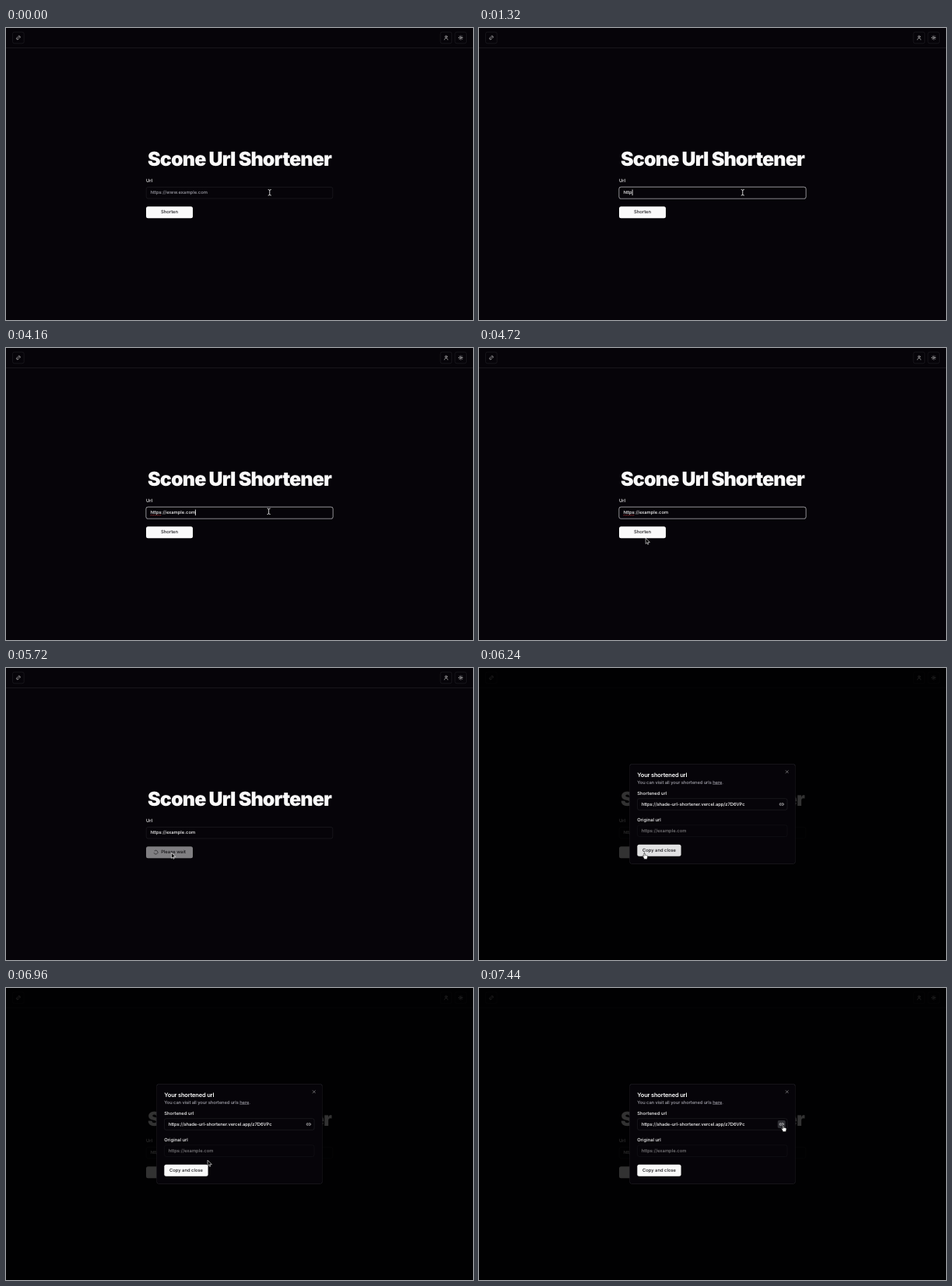
Recreate the animation shown at these times as an HTML page. Size 600x375 px, loop 8000 ms.

```html
<!DOCTYPE html>
<html lang="en">
<head>
<meta charset="utf-8">
<title>Url shortener</title>
<style>
  html, body { margin: 0; width: 100%; height: 100%; overflow: hidden; background: #060409; }
  #stage { position: relative; width: 1440px; height: 900px; transform: scale(calc(600 / 1440)); transform-origin: 0 0;
    overflow: hidden; background: #060409; color: #fafafa; font: 450 14px/20px Inter, sans-serif;
    text-rendering: geometricPrecision; font-feature-settings: "calt" 0; }
  #stage * { box-sizing: border-box; }
  .abs, .field, .button, .icon, .label { position: absolute; white-space: pre; }
  svg { fill: none; stroke: currentColor; stroke-width: 2; stroke-linecap: round; stroke-linejoin: round; }
  header { position: absolute; width: 100%; height: 61px; border-bottom: 1px solid #303035; }
  .icon { width: 36px; height: 36px; top: 12px; border: 1px solid #303035; border-radius: 6px; display: grid; place-items: center; }
  h1 { position: absolute; margin: 0; top: 374px; width: 100%; text-align: center; font: 900 60px/60px Inter, sans-serif; letter-spacing: -.035em; }
  .label { font-weight: 550; }
  .field { height: 36px; padding: 0 12px; line-height: 34px; border: 1px solid #303035; border-radius: 6px; }
  .field.focus { border-color: #b8b8bc; box-shadow: 0 0 0 1px #b8b8bc; }
  .muted { color: #a1a1aa; }
  .wavy { text-decoration: underline wavy #c33 1px; text-underline-offset: 1px; text-decoration-skip-ink: none; }
  #caret { display: inline-block; width: 2px; height: 18px; margin-right: -2px; vertical-align: -4px; background: #fafafa; }
  .button { height: 36px; border-radius: 6px; background: #fafafa; color: #18181b; font-weight: 550;
    display: flex; gap: 8px; align-items: center; justify-content: center; }
  .button.hover { background: #e2e2e3; }
  #overlay { inset: 0; background: #000c; }
  #dialog { left: 464px; top: 296px; width: 512px; height: 308px; border-radius: 8px; background: #060409; box-shadow: inset 0 0 0 1px #303035; }
  #copy { left: 457px; top: 112px; width: 24px; height: 24px; border-radius: 4px; display: grid; place-items: center; }
  #copy.hover { background: #303035; }
  #cursor { left: 0; top: 0; overflow: visible; }
</style>
</head>
<body>
<div id="stage">
  <header>
    <div class="icon" style="left:20px"><svg width="16" height="16" viewBox="0 0 24 24"><path id="chain" transform="rotate(-45 12 12)" d="M9 17H7A5 5 0 0 1 7 7h2M15 7h2a5 5 0 1 1 0 10h-2M8 12h8"/></svg></div>
    <div class="icon" style="left:1339px"><svg width="16" height="16" viewBox="0 0 24 24"><circle cx="12" cy="7" r="4.5"/><path d="M4 21.5C4.5 17 7.5 14 12 14s7.500 3 8 7.500"/></svg></div>
    <div class="icon" style="left:1384px"><svg width="16" height="16" viewBox="0 0 24 24"><circle cx="12" cy="12" r="4"/><path d="M12 2v2M12 20v2M2 12h2M20 12h2M4.9 4.9l1.4 1.4M17.7 17.7l1.4 1.4M4.9 19.1l1.4-1.4M17.7 6.3l1.4-1.4"/></svg></div>
  </header>
  <h1>Scone Url Shortener</h1>
  <div class="label" style="left:432px;top:460px">Url</div>
  <div class="field" id="url" style="left:432px;top:490px;width:576px"><span id="scheme"></span><span id="rest"></span><span id="caret"></span><span id="hint" class="muted">https://www.example.com</span></div>
  <div class="button" id="shorten" style="left:432px;top:550px;width:144px"><svg id="spinner" width="16" height="16" viewBox="0 0 24 24"><path d="M21 12a9 9 0 1 1-6.22-8.56"/></svg><span id="action"></span></div>

  <div class="abs" id="overlay"></div>
  <div class="abs" id="dialog">
    <div class="abs" style="left:24px;top:24px;font-size:18px;font-weight:600;letter-spacing:-.025em">Your shortened url</div>
    <div class="abs muted" style="left:24px;top:48px;letter-spacing:-.25px">You can visit all your shortened urls <u>here</u>.</div>
    <svg class="abs" style="left:478px;top:16px" width="16" height="16" viewBox="0 0 24 24" opacity=".7"><path d="M18 6 6 18M6 6l12 12"/></svg>
    <div class="label" style="left:24px;top:81px">Shortened url</div>
    <div class="field" style="left:24px;top:106px;width:463px;letter-spacing:-.15px">https://shade-url-shortener.vercel.app/z7D6VPc</div>
    <div class="abs" id="copy"><svg width="16" height="16" viewBox="0 0 24 24"><path d="M9 17H7A5 5 0 0 1 7 7h2M15 7h2a5 5 0 1 1 0 10h-2M8 12h8"/></svg></div>
    <div class="label" style="left:24px;top:163px">Original url</div>
    <div class="field" style="left:24px;top:188px;width:463px;opacity:.5">https://example.com</div>
    <div class="button" id="close" style="left:24px;top:248px;width:135px">Copy and close</div>
  </div>

  <svg class="abs" id="cursor" width="20" height="20">
    <path id="arrow" d="M0 0V16.5L3.9 12.8 6.3 18.5 8.8 17.4 6.4 11.9H11.7Z" fill="#000" stroke="#fff" stroke-width="1.4"/>
    <path id="beam" d="M-4-9Q0-9 0-6 0-9 4-9M0-6V6M-4 9Q0 9 0 6 0 9 4 9" stroke="#eee"/>
    <path id="hand" transform="translate(-5.5)" d="M5.5 0C4.4 0 4 .9 4 2V10.2L2.6 8.6C1.8 7.7.6 7.6 0 8.3-.5 9 .1 9.8.6 10.6L4 16.4V19H14V16.5C15 14.5 15.5 12.5 15.5 9.5 15.5 8 14 7.5 13 8 12.8 6.8 11 6.5 10.3 7.3 9.8 6.3 8 6.2 7.2 6.9V2C7.2.9 6.7 0 5.5 0Z" fill="#fff" stroke="#000" stroke-width="1.2"/>
  </svg>
</div>
<script>
const LOOP = 8000, FOCUS = 440, BLUR = 4960, LOADING = 5080, OPEN = 5920;
const URL_TEXT = 'https://example.com';
// [time, characters visible]
const KEYS = [[840, 1], [1000, 2], [1200, 3], [1320, 4], [1720, 6], [2000, 7], [2120, 8], [2440, 9], [2720, 11],
  [2800, 12], [2960, 13], [3040, 14], [3120, 15], [3280, 16], [3440, 17], [3520, 18], [4160, 19]];
const $ = id => document.getElementById(id);
const progress = (t, from, to) => Math.min(1, Math.max(0, (t - from) / (to - from)));
const smooth = p => p * p * (3 - 2 * p);
const mix = (a, b, p) => a + (b - a) * p;
const bezier = (a, b, c, p) => mix(mix(a, b, p), mix(b, c, p), p);
const show = (id, on) => { $(id).style.display = on ? '' : 'none'; };

function pointer(t) {
  if (t < 4720) {
    const p = smooth(progress(t, 4130, 4720));
    return [bezier(813, 640, 514, p), bezier(507, 290, 587, p)];
  }
  if (t < 6720) {
    const p = smooth(progress(t, 4720, 4960));
    return [mix(514, 510, p), mix(587, 570, p)];
  }
  const p = smooth(progress(t, 6720, 7440));
  return [mix(510, 938, p), mix(570, 424, p)];
}

function draw(t) {
  const loading = t >= LOADING && t < OPEN, open = t >= OPEN, focus = t >= FOCUS && t < BLUR;
  const count = KEYS.reduce((n, [time, chars]) => t >= time ? chars : n, 0);

  $('url').classList.toggle('focus', focus);
  $('scheme').textContent = URL_TEXT.slice(0, Math.min(count, 5));
  $('scheme').className = focus && t >= 2200 ? 'wavy' : '';
  $('rest').textContent = URL_TEXT.slice(5, Math.max(count, 5));
  show('caret', focus && t < 4660);
  show('hint', !count);

  const [x, y] = pointer(t);
  const over = (left, top, width, height) => x >= left && x <= left + width && y >= top && y <= top + height;
  const onShorten = !open && !loading && over(432, 550, 144, 36);
  const onClose = open && over(488, 544, 135, 36);
  const onCopy = open && over(921, 408, 24, 24);
  const onText = open ? over(488, 402, 463, 36) : over(432, 490, 576, 36) || over(434, 374, 572, 60);
  const shape = onShorten || onClose || onCopy ? 'hand' : onText ? 'beam' : 'arrow';
  for (const id of ['arrow', 'beam', 'hand']) show(id, id === shape);
  $('cursor').style.transform = `translate(${x}px, ${y}px)`;
  $('close').classList.toggle('hover', onClose);
  $('copy').classList.toggle('hover', onCopy);

  $('shorten').classList.toggle('hover', onShorten);
  $('shorten').style.opacity = loading ? .5 : 1;
  $('action').textContent = loading ? 'Please wait' : 'Shorten';
  show('spinner', loading);
  $('spinner').style.transform = `rotate(${(t - LOADING) * .36}deg)`;

  const enter = 1 - (1 - progress(t, OPEN - 20, OPEN + 180)) ** 3;
  show('overlay', open);
  show('dialog', open);
  $('overlay').style.opacity = $('dialog').style.opacity = enter;
  $('dialog').style.transform = `translateY(${6 * (1 - enter)}px) scale(${mix(.95, 1, enter)})`;
}

function tick() {
  draw(performance.now() % LOOP);
  requestAnimationFrame(tick);
}
tick();
</script>
</body>
</html>
```
